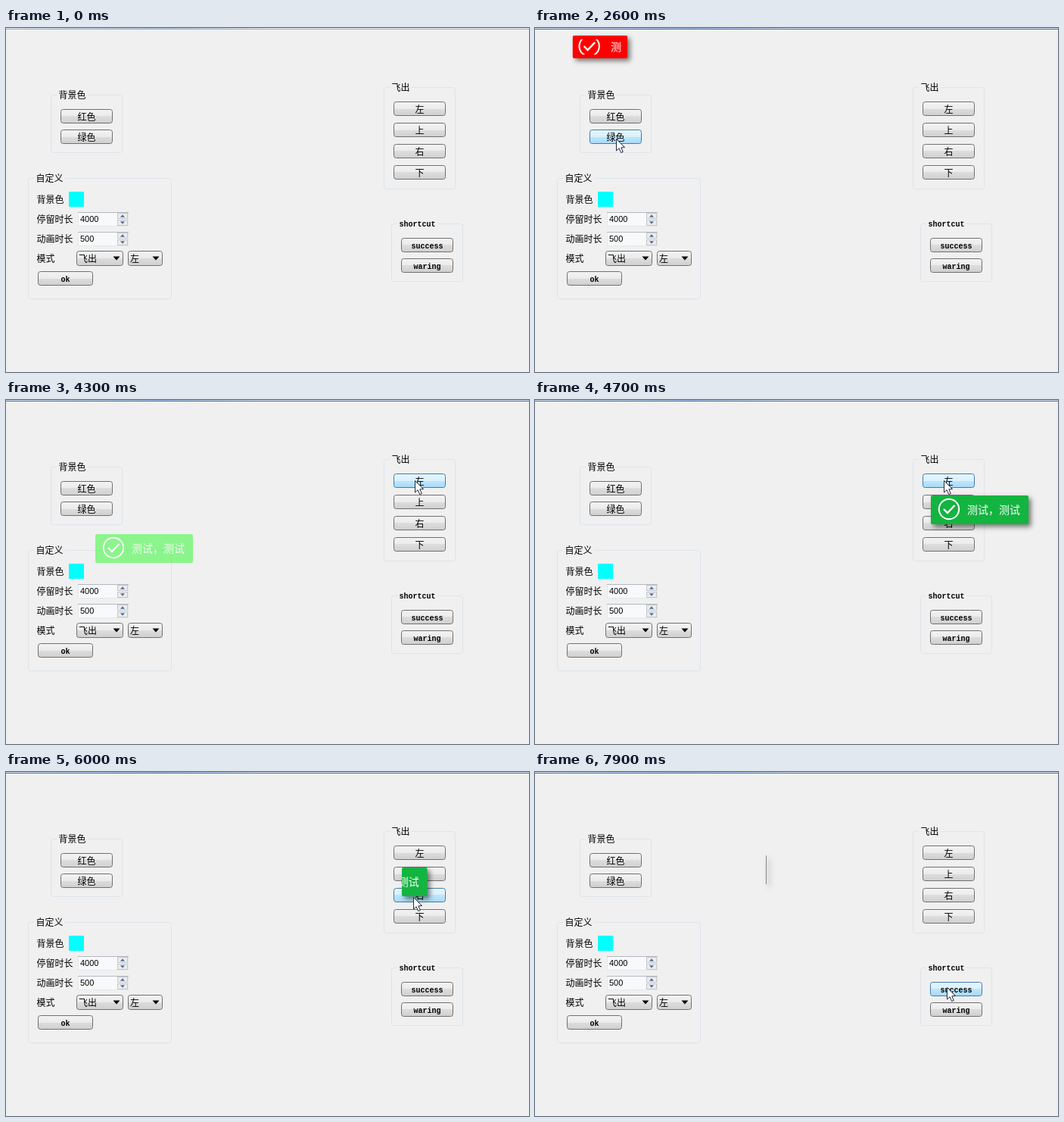
An HTML page with a canvas that plays this animation: 691x454 px, repeating every 8000 ms.

```html
<!DOCTYPE html>
<html lang="zh-CN">
<head>
<meta charset="utf-8">
<style>
html, body { margin: 0; width: 100%; height: 100%; overflow: hidden; background: #f0f0f0; }
canvas { display: block; }
</style>
</head>
<body>
<canvas id="stage" width="691" height="454"></canvas>
<script>
const ctx = document.getElementById('stage').getContext('2d');
const LOOP = 8000, STEP = 100, EXIT = 890;
const FONTS = {
  cjk: '12px "Noto Sans CJK SC", "Noto Sans CJK", sans-serif',
  word: 'bold 10px "Liberation Mono", monospace',
  digits: '11px "Liberation Sans", sans-serif',
  toast: '14px "Noto Sans CJK TC", "Noto Sans CJK", sans-serif' // centred comma
};

// time, x, y of the pointer tip
const POINTER = [
  [300, 572, 74], [600, 271, 137], [700, 271, 137], [1300, 106, 118], [2000, 106, 118],
  [2400, 107, 146], [2600, 107, 146], [2800, 150, 204], [2900, 180, 201], [3700, 455, 104],
  [3800, 455, 104], [4200, 540, 106], [4800, 540, 106], [5400, 519, 152], [5700, 532, 163],
  [6100, 540, 166], [6500, 540, 166], [7000, 539, 205], [7400, 544, 273], [7800, 544, 284]
];

const GROUPS = [
  [59, 88, 95, 77, '背景色', 37], [29, 198, 190, 160, '自定义', 37],
  [499, 78, 95, 135, '飞出', 25], [509, 258, 95, 77, 'shortcut', 49]
];
const BUTTONS = [
  [72, 107, 69, '红色'], [72, 134, 69, '绿色'], [42, 321, 73, 'ok'],
  [512, 97, 69, '左'], [512, 125, 69, '上'], [512, 153, 69, '右'], [512, 181, 69, '下'],
  [522, 277, 69, 'success'], [522, 304, 69, 'waring']
];
const TOASTS = [
  { x: 40, y: 6, w: 92, text: '测试', color: '#f00', show: 1500, leave: 2410, mode: 'shrink' },
  { x: 118, y: 177, w: 129, color: '#0afa0a', show: 2800, leave: 3800, mode: 'fade' },
  { x: 523, y: 126, w: 129, color: '#14b440', show: 4500, leave: 5342, mode: 'left' },
  { x: 177, y: 110, w: 129, color: '#14b440', show: 6100, leave: 7000, mode: 'right', linger: 200 }
];

function rounded(x, y, w, h, r) {
  ctx.beginPath();
  ctx.roundRect(x, y, w, h, r);
}

function polyline(points) {
  ctx.beginPath();
  points.forEach(([x, y]) => ctx.lineTo(x, y));
}

function label(text, x, y, align = 'left') {
  const kind = /^\d+$/.test(text) ? 'digits' : /^\w+$/.test(text) ? 'word' : 'cjk';
  ctx.font = FONTS[kind];
  ctx.textAlign = align;
  ctx.fillStyle = '#000';
  ctx.fillText(text, x, y + (kind === 'word' ? 4 : kind === 'digits' ? 4 : 5));
}

function triangle(x, y, w, h, color) {
  polyline([[x - w, y - h], [x + w, y - h], [x, y + h]]);
  ctx.fillStyle = color;
  ctx.fill();
}

function buttonFace(x, y, w, h, hot) {
  const colors = hot ? ['#eaf6fd', '#d9f0fc', '#bee6fd', '#a7d9f5']
                     : ['#f3f3f3', '#ebebeb', '#dddddd', '#cfcfcf'];
  const face = ctx.createLinearGradient(0, y, 0, y + h);
  [0, .5, .5, 1].forEach((stop, i) => face.addColorStop(stop, colors[i]));
  rounded(x + .5, y + .5, w - 1, h - 1, 3);
  ctx.fillStyle = face;
  ctx.fill();
  ctx.strokeStyle = hot ? '#3c7fb1' : '#707070';
  ctx.stroke();
}

function button([x, y, w, text], mouse) {
  const hot = mouse && mouse[0] >= x && mouse[0] < x + w && mouse[1] >= y && mouse[1] < y + 19;
  buttonFace(x, y, w, 19, hot);
  label(text, x + w / 2, y + 10, 'center');
}

function combo(x, w, text) {
  buttonFace(x, 294, w, 20);
  label(text, x + 3, 304);
  triangle(x + w - 9, 304, 4.5, 2.5, '#000');
}

function spinBox(y, text) {
  ctx.fillStyle = '#f8f9fb';
  ctx.fillRect(95, y, 67, 19);
  ctx.strokeStyle = '#e3e7ee';
  ctx.strokeRect(95.5, y + .5, 66, 18);
  ctx.fillStyle = '#b4b8c0';
  ctx.fillRect(95, y, 67, 1);
  for (const [top, flip] of [[y + 1, -1], [y + 10, 1]]) {
    ctx.fillStyle = '#ececec';
    ctx.fillRect(147, top, 14, 8);
    ctx.strokeStyle = '#c3c7cc';
    ctx.strokeRect(147.5, top + .5, 13, 7);
    triangle(154, top + 4, 3, 1.8 * flip, '#4d6da5');
  }
  label(text, 98, y + 9);
}

function group([x, y, w, h, title, titleWidth]) {
  rounded(x + .5, y + .5, w - 1, h - 1, 3);
  ctx.strokeStyle = '#dce4ea';
  ctx.stroke();
  ctx.fillStyle = '#f0f0f0';
  ctx.fillRect(x + 8, y - 1, titleWidth + 4, 3);
  label(title, x + 10.5, y);
}

function topEdge(active) {
  ctx.fillStyle = active ? '#dfe5ee' : '#e6eaee';
  ctx.fillRect(0, 0, 691, 1);
  ctx.fillStyle = active ? '#54709f' : '#a3afbd';
  ctx.fillRect(0, 1, 691, 1);
  const glow = ctx.createLinearGradient(0, 0, 345, 0);
  glow.addColorStop(0, '#dfe6ee');
  glow.addColorStop(.6, '#a9c3e0');
  glow.addColorStop(1, '#a9c3e000');
  ctx.fillStyle = glow;
  ctx.fillRect(0, 0, 345, 1);
}

function toast({ x, y, w, text = '测试，测试', color, show, leave, mode, linger = 0 }, t) {
  if (t < show || t >= leave + EXIT + linger) return;
  const p = Math.min(Math.max((t - leave) / EXIT, 0), 1);
  const slide = Math.min(p * w, w - 1);
  let h = 38, left = x, contentX = x, iconX = 24, textX = 48, inset = 0, ink = '#fff';

  ctx.save();
  if (mode === 'shrink') {
    left = contentX = x + w * p / 2;
    y += h * p / 2;
    w *= 1 - p;
    h *= 1 - p;
    iconX -= 10 * p;
    textX += 10 * p;
    inset = 5;
  } else if (mode === 'left') {
    w -= slide;
    contentX -= slide;
  } else if (mode === 'right') {
    w -= slide;
    left += slide;
    contentX += slide;
  }

  if (mode === 'fade' && t >= leave) {
    const shade = 255 - 15 * p; // white fading into the window grey
    ink = `rgb(${shade},${shade},${shade})`;
    ctx.globalAlpha = 1 - p;
  } else {
    ctx.shadowColor = 'rgba(0,0,0,.5)';
    ctx.shadowBlur = 6;
    ctx.shadowOffsetX = ctx.shadowOffsetY = 3.5;
  }
  rounded(left, y, w, h, Math.min(2, w / 2));
  ctx.fillStyle = w <= 1 ? '#888' : color;
  ctx.fill();
  ctx.shadowColor = 'transparent';
  ctx.globalAlpha = 1;

  ctx.beginPath();
  ctx.rect(left, y + inset, Math.max(w - inset * 1.4, 0), Math.max(h - inset * 2, 0));
  ctx.clip();
  const cx = contentX + iconX, cy = y + h / 2 - 1;
  ctx.strokeStyle = ctx.fillStyle = ink;
  ctx.lineWidth = 2;
  ctx.beginPath();
  ctx.arc(cx, cy, 13.2, 0, 7);
  ctx.stroke();
  polyline([[cx - 7, cy], [cx - 2, cy + 5], [cx + 7.5, cy - 5]]);
  ctx.lineWidth = 2.4;
  ctx.stroke();
  ctx.font = FONTS.toast;
  ctx.textAlign = 'left';
  ctx.fillText(text, contentX + textX, cy + 6);
  ctx.restore();
}

function pointerAt(t) {
  if (t < POINTER[0][0]) return null;
  const i = POINTER.findIndex(k => k[0] > t);
  if (i < 0) return POINTER.at(-1).slice(1);
  const [t0, x0, y0] = POINTER[i - 1], [t1, x1, y1] = POINTER[i];
  const p = (t - t0) / (t1 - t0);
  return [x0 + (x1 - x0) * p, y0 + (y1 - y0) * p];
}

function pointer([x, y]) {
  ctx.save();
  ctx.translate(Math.round(x) + .5, Math.round(y) + .5);
  polyline([[0, 0], [0, 15.5], [3.6, 12.2], [6.2, 18], [8.8, 17], [6.3, 11.3], [11, 11]]);
  ctx.closePath();
  ctx.fillStyle = '#fff';
  ctx.fill();
  ctx.strokeStyle = '#222a3c';
  ctx.stroke();
  ctx.restore();
}

function draw(t) {
  const mouse = pointerAt(t);
  ctx.lineWidth = 1;
  ctx.fillStyle = '#f0f0f0';
  ctx.fillRect(0, 0, 691, 454);
  topEdge(t >= 1500);
  GROUPS.forEach(group);
  BUTTONS.forEach(b => button(b, mouse));
  ['背景色', '停留时长', '动画时长', '模式'].forEach((s, i) => label(s, 40.5, 226 + i * 26));
  ctx.fillStyle = '#0ff';
  ctx.fillRect(83, 216, 20, 20);
  spinBox(243, '4000');
  spinBox(269, '500');
  combo(93, 62, '飞出');
  combo(161, 46, '左');
  TOASTS.forEach(item => toast(item, t));
  if (mouse) pointer(mouse);
}

function tick() {
  const t = performance.now() % LOOP;
  draw(Math.floor(t / STEP) * STEP);
  requestAnimationFrame(tick);
}
tick();
</script>
</body>
</html>
```
